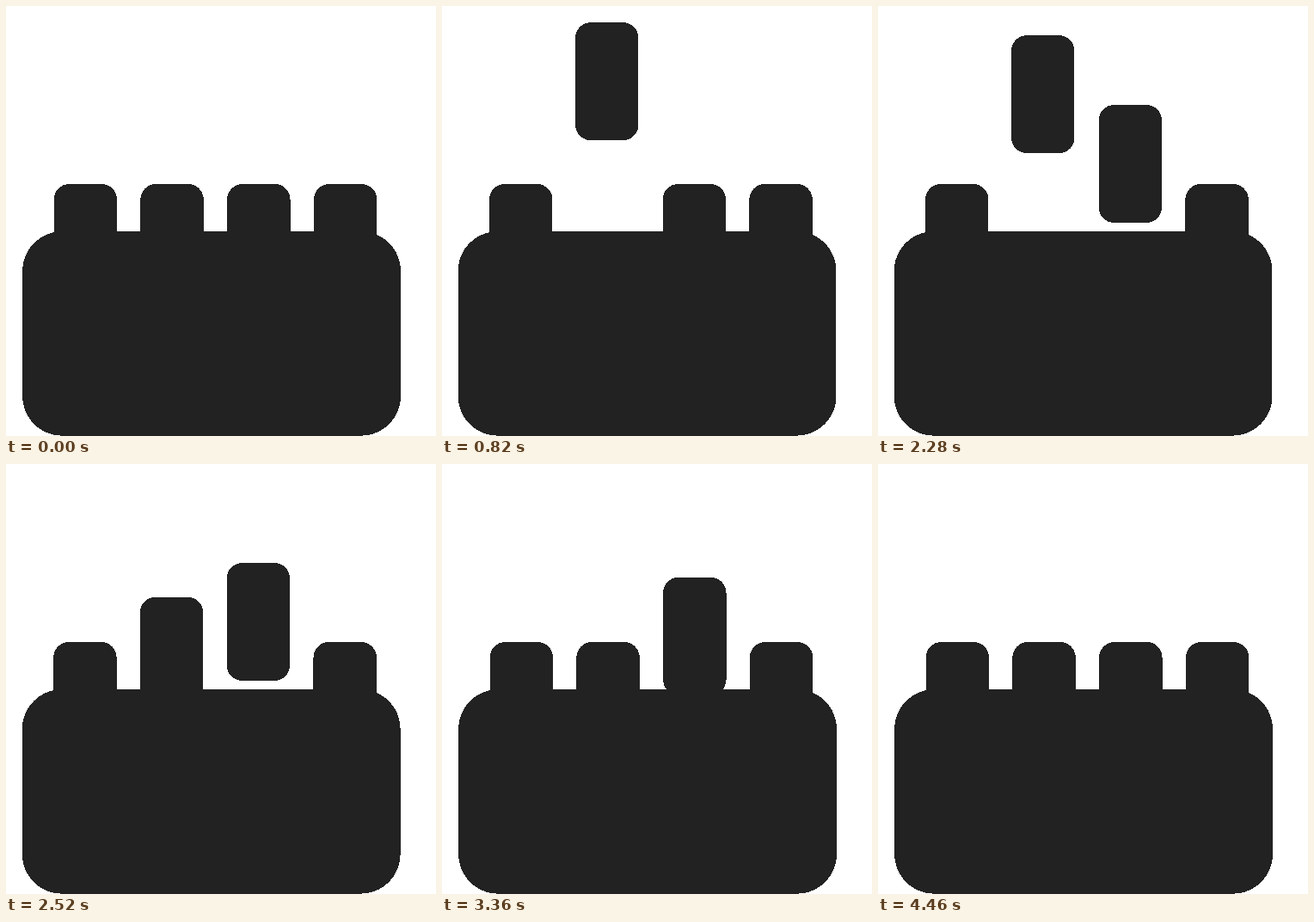
An HTML page for the animation above (4480 ms loop, 500 by 500 pixels).

```html
<!DOCTYPE html>
<html lang="en">
<head>
<meta charset="utf-8">
<title>Finger count</title>
<style>
  html, body { margin: 0; width: 100%; height: 100%; overflow: hidden; background: #fff; }
  svg { display: block; width: 500px; height: 500px; }
  rect { fill: #222; shape-rendering: crispEdges; }
</style>
</head>
<body>
<svg id="stage" viewBox="0 0 500 500"></svg>
<script>
const stage = document.getElementById('stage');
const LOOP = 4480;
const STEP = 20;
const REST = 207;
const PALM = { left: 19.2, top: 262.2, width: 439.75, height: 237.4, radius: 46 };
const FINGER = { left: 55.6, gap: 100.76, width: 73.4, height: 137, radius: 18 };

// Each move: start, duration, end value
const middleTop = [[240, 780, 24], [2260, 828, REST]];
const middleLean = [[240, 780, -0.8], [2260, 828, 0]];
const ringTop = [[1266, 735, 115], [3265, 1200, REST]];
const handShift = [[240, 540, -0.52], [2260, 1120, 0]];

const bezier = (a, b, s) =>
  3 * a * s * (1 - s) ** 2 + 3 * b * s * s * (1 - s) + s ** 3;

const linear = u => Math.min(u, 1);

// Quick rise, slight overshoot, soft settle
function settle(u) {
  if (u >= 1) return 1;
  let lo = 0, hi = 1;
  for (let i = 0; i < 30; i++) {
    const mid = (lo + hi) / 2;
    if (bezier(0.61, 0.4, mid) < u) lo = mid; else hi = mid;
  }
  return bezier(1.4, 1, lo);
}

function follow(moves, initial, t, ease = settle) {
  let value = initial, from = initial;
  for (const [start, duration, to] of moves) {
    if (t < start) break;
    value = from + (to - from) * ease((t - start) / duration);
    from = to;
  }
  return value;
}

function block({ width, height, radius }) {
  const rect = document.createElementNS('http://www.w3.org/2000/svg', 'rect');
  Object.entries({ width, height, rx: radius }).forEach(([k, v]) => rect.setAttribute(k, v));
  return stage.appendChild(rect);
}

function place(rect, x, y) {
  rect.setAttribute('x', x);
  rect.setAttribute('y', y);
}

const palm = block(PALM);
const fingers = Array.from({ length: 4 }, () => block(FINGER));

function draw(t) {
  const shift = follow(handShift, 0, t, linear);
  const leans = [0, follow(middleLean, 0, t), 0, 0];
  const tops = [REST, follow(middleTop, REST, t), follow(ringTop, REST, t), REST];
  place(palm, PALM.left + shift, PALM.top);
  fingers.forEach((finger, i) =>
    place(finger, FINGER.left + i * FINGER.gap + shift + leans[i], tops[i]));
}

const origin = performance.now();
function tick() {
  const t = (performance.now() - origin) % LOOP;
  draw(Math.floor(t / STEP) * STEP);
  requestAnimationFrame(tick);
}
tick();
</script>
</body>
</html>
```
